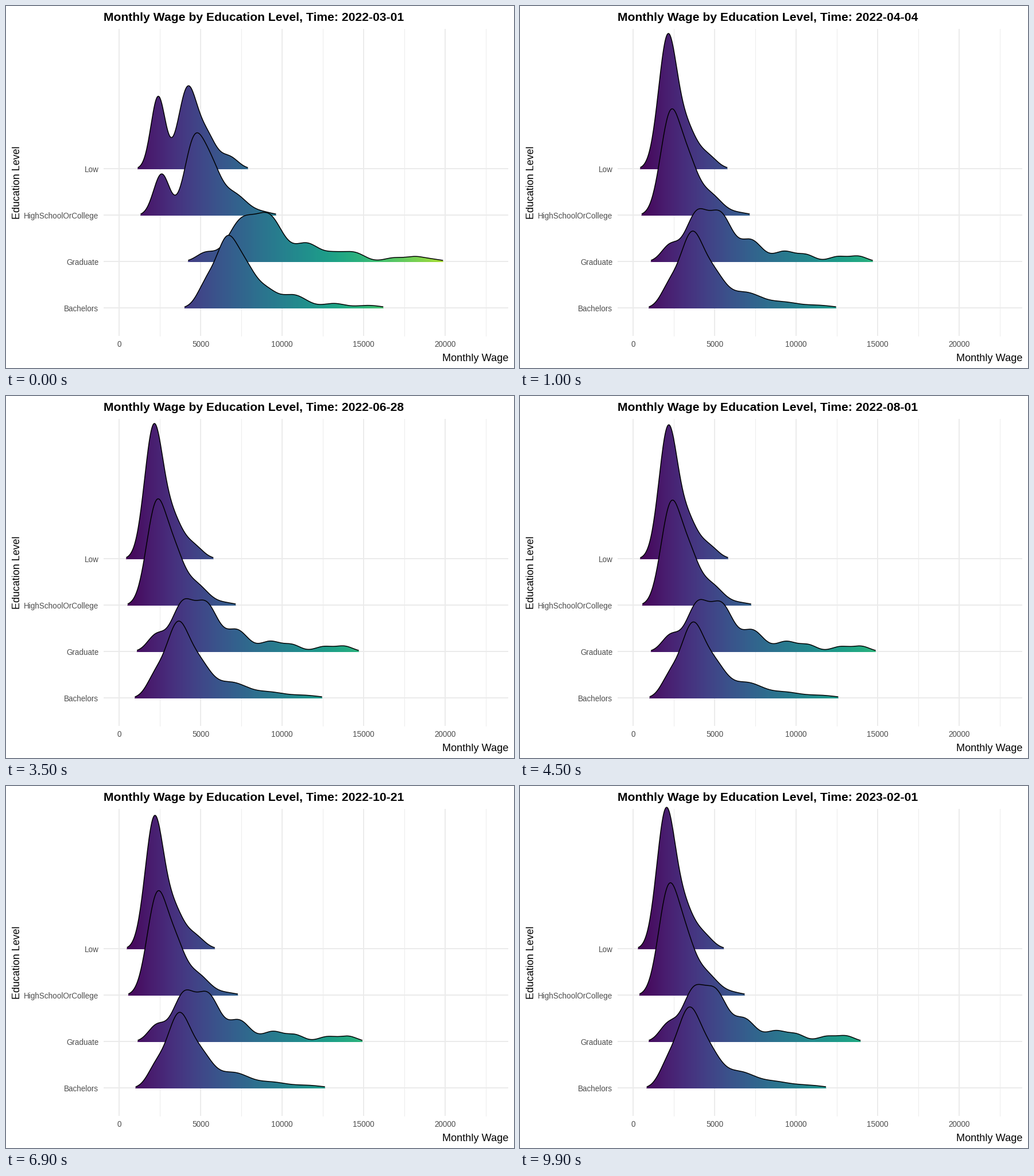
A matplotlib script for the animation above (10000 ms loop, 885 px wide and 632 px high).

```python
import numpy as np
import matplotlib.pyplot as plt
from matplotlib.animation import FuncAnimation
from matplotlib.path import Path

W, H, DPI = 885, 632, 100
FRAMES, INTERVAL = 100, 100
LEFT, RIGHT, TOP, BOTTOM = 170, 875, 40, 576
X0, PX_PER_K = 197, 28.4     # wages are in thousands
BASE, STEP = 284, 81         # baseline of the top ridge, gap between ridges
MIN_HEIGHT = 2.4             # ridges are cut off below this height
FADE = 9                     # frames from the first month to the second
START, DAYS = np.datetime64("2022-03-01"), 337

WAGE = np.linspace(0.177, 22.745, 512)
GRID = X0 + 0.5 + PX_PER_K * WAGE
DARK, PALE = "#4d4d4d", "#ebebeb"

plt.rcParams["font.family"] = "Liberation Sans"


def px(size):
    return size * 72 / DPI


def density(bumps, rate=1.0):
    """Sum of normal bumps (wage, spread, height) with the wages rescaled."""
    total = sum(h * np.exp(-((WAGE - rate * wage) / spread) ** 2 / 2)
                for wage, spread, h in bumps)
    return total * rate ** -0.6


def wage_rate(frame):
    """Level of all wages, relative to the second month."""
    return np.interp(frame, [35, 55, 69, 87, 90, 99],
                     [1, 1.025, 1.018, 1.032, 1.032, 0.945])


class Ridge:
    def __init__(self, ax, row, name, first, later):
        self.base = BASE + STEP * row
        self.first, self.later = density(first), later
        ax.text(161.5, self.base + 6, name, ha="right", color=DARK, size=px(13.5))
        shades = plt.get_cmap("viridis")(np.linspace(0, 1, 512))[None]
        self.fill = ax.imshow(shades, aspect="auto", zorder=2 + row,
                              extent=(GRID[0], GRID[-1], self.base + 1, TOP - 5))
        self.line, = ax.plot([], [], color="black", lw=px(1.5), zorder=2.5 + row)

    def draw(self, frame):
        mix = min(frame / FADE, 1)
        h = (1 - mix) * self.first + mix * density(self.later, wage_rate(frame))
        shown = h >= MIN_HEIGHT
        y = self.base + 0.5 - h
        self.line.set_data(GRID, np.where(shown, y, np.nan))
        floor = self.base + 1
        top = np.c_[GRID, np.where(shown, y, floor)]
        outline = np.r_[[[GRID[0], floor]], top, [[GRID[-1], floor]]]
        self.fill.set_clip_path(Path(outline), self.fill.axes.transData)


def grid_line(ax, xs, ys, width):
    ax.plot(xs, ys, lw=px(width), color=PALE, solid_capstyle="butt",
            antialiased=False, zorder=1)


fig = plt.figure(figsize=(W / DPI, H / DPI), dpi=DPI, facecolor="white")
ax = fig.add_axes([0, 0, 1, 1])
ax.set_xlim(0, W)
ax.set_ylim(H, 0)
ax.axis("off")

for wage in range(0, 22501, 2500):
    x = X0 + wage / 1000 * PX_PER_K
    major = wage % 5000 == 0
    grid_line(ax, [x, x], [TOP, BOTTOM], 2 if major else 1)
    if major:
        ax.text(x, 595, str(wage), ha="center", color=DARK, size=px(13.5))
for row in range(4):
    y = BASE + STEP * row
    grid_line(ax, [LEFT, RIGHT], [y, y], 2)

title = ax.text(LEFT, 26.5, "", weight="bold", size=px(21.1))
ax.text(RIGHT, 619.5, "Monthly Wage", ha="right", size=px(18.1))
ax.text(24, 308, "Education Level", rotation=90, rotation_mode="anchor",
        ha="center", va="baseline", size=px(17.9))

ridges = [
    Ridge(ax, 0, "Low",
          first=[(2.38, .44, 126), (4.19, .58, 140), (5.39, .55, 52),
                 (6.73, .55, 21)],
          later=[(2.10, .56, 226), (3.27, .60, 66), (4.54, .58, 22)]),
    Ridge(ax, 1, "HighSchoolOrCollege",
          first=[(2.59, .49, 72), (4.54, .58, 116), (5.56, .63, 80),
                 (7.04, .77, 36), (8.80, .63, 5)],
          later=[(2.25, .60, 168), (3.35, .60, 80), (4.68, .74, 36),
                 (6.51, .60, 4)]),
    Ridge(ax, 2, "Graduate",
          first=[(5.28, .56, 15), (7.50, .85, 70), (9.23, .81, 74),
                 (11.48, .74, 31), (13.20, .70, 14), (14.47, .63, 14),
                 (16.83, .60, 6.7), (18.13, .56, 8), (19.23, .60, 4)],
          later=[(2.25, .53, 28), (3.87, .67, 81), (5.35, .70, 80),
                 (7.22, .67, 37), (9.26, .63, 18), (10.60, .53, 11.5),
                 (12.54, .56, 9), (13.80, .53, 9.5)]),
    Ridge(ax, 3, "Bachelors",
          first=[(5.35, .56, 40), (6.55, .62, 104), (7.71, .70, 68),
                 (9.08, .60, 24), (10.67, .81, 23), (13.17, .67, 8),
                 (15.28, .77, 4.8)],
          later=[(2.18, .53, 32), (3.56, .70, 125), (4.93, .70, 52),
                 (6.87, .99, 27), (9.23, .88, 9.5), (11.34, .92, 4.8)]),
]


def update(frame):
    date = START + frame * DAYS // (FRAMES - 1)
    title.set_text(f"Monthly Wage by Education Level, Time: {date}")
    for ridge in ridges:
        ridge.draw(frame)


anim = FuncAnimation(fig, update, frames=FRAMES, interval=INTERVAL,
                     init_func=lambda: update(0), repeat=True, repeat_delay=0)
plt.show()
```
